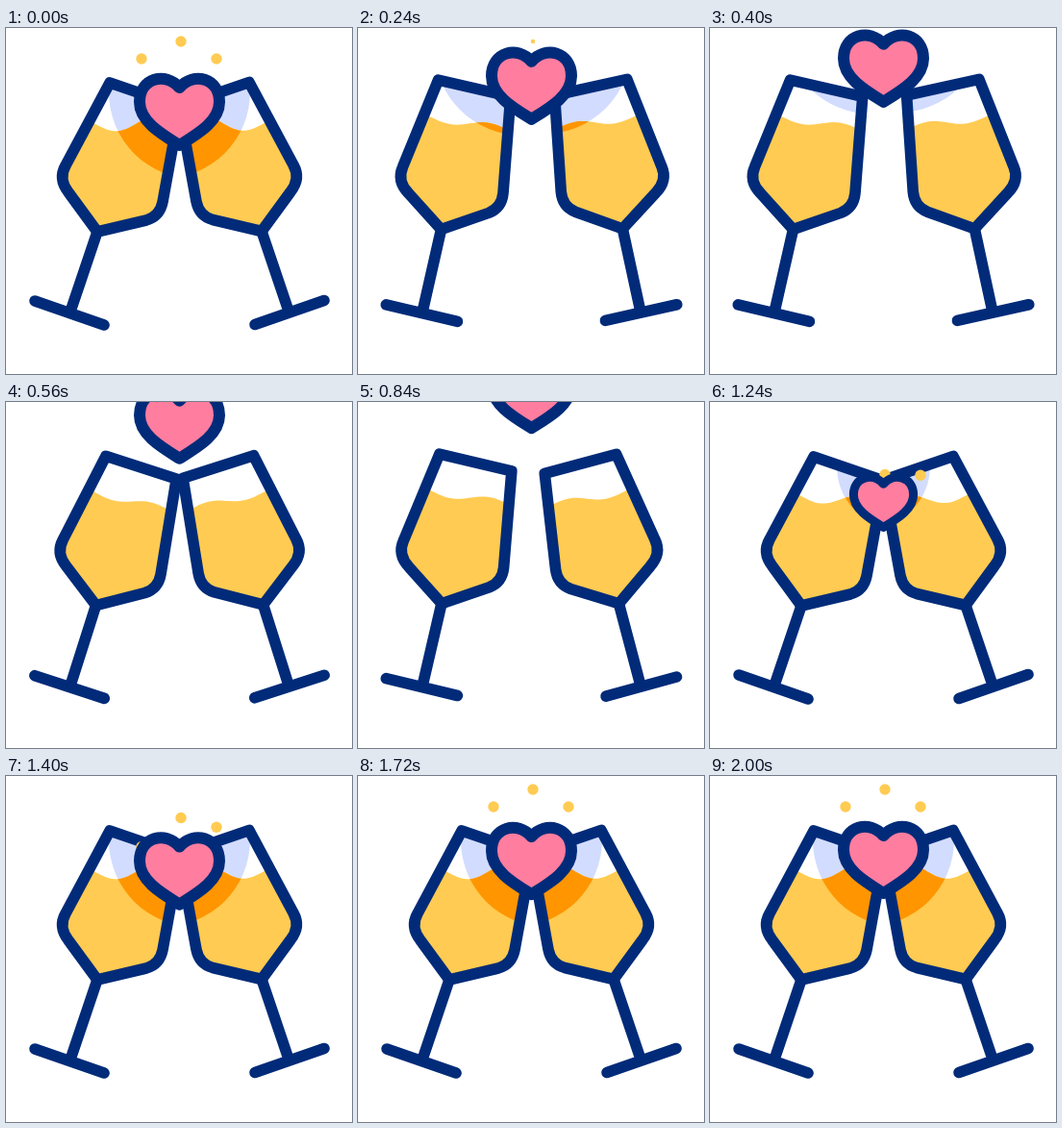
An HTML page with a canvas for the animation above (2.04 s loop, 360 by 360 pixels).

```html
<!DOCTYPE html>
<html lang="en">
<head>
<meta charset="utf-8">
<title>Toast</title>
<style>
  html, body { margin: 0; width: 100%; height: 100%; overflow: hidden; background: #fff; }
  canvas { display: block; width: 360px; height: 360px; }
</style>
</head>
<body>
<canvas id="stage"></canvas>
<script>
const LOOP = 2040, STEP = 40, SIZE = 360;
const SWING = 640, CLINK = 1040;   // end of the first and second swing
const AXIS = 180.5, HEART_Y = 87;
const FOOT = { x: 67, y: 293 };
const NAVY = '#012b79', WINE = '#ffcb52', AMBER = '#ff9500',
      PALE = '#d2dcfe', PINK = '#ff7d9f';

const canvas = document.getElementById('stage');
const ctx = canvas.getContext('2d');
const dpr = window.devicePixelRatio || 1;
canvas.width = canvas.height = SIZE * dpr;

const bowl = new Path2D('M108 57L181 82L163 181Q160 196 146 200L95 212L65 171Q54 157 62 143Z');
const stand = new Path2D('M95 212L68 292M30 284L102 309');
const heart = new Path2D('M180.5 62C166 45 139 52 139 77C139 97 161 110 180.5 122' +
                         'C200 110 222 97 222 77C222 52 195 45 180.5 62Z');

const ramp = (t, a, b) => Math.min(1, Math.max(0, (t - a) / (b - a)));
const smooth = p => (1 - Math.cos(Math.PI * p)) / 2;
const mix = (a, b, p) => a + (b - a) * p;
const bump = p => Math.sin(Math.PI * p) ** 2;

// Peak tilt in degrees of the two swings
const glasses = [
  { mirror: false, first: 6.9, second: 5.6 },
  { mirror: true, first: 7.6, second: 3.8 }
];

const dots = [
  { x: 141, y: 32, start: 1320, fadeEnd: 200 },
  { x: 182, y: 14, start: 1190, fadeEnd: 400 },
  { x: 219, y: 32, start: 1190, fadeEnd: 200 }
];

function disc(x, y, r, color) {
  ctx.fillStyle = color;
  ctx.beginPath();
  ctx.arc(x, y, r, 0, Math.PI * 2);
  ctx.fill();
}

function tiltBy(deg) {
  ctx.translate(FOOT.x, FOOT.y);
  ctx.rotate(deg * Math.PI / 180);
  ctx.translate(-FOOT.x, -FOOT.y);
}

// The surface slopes and flattens while the glass is in motion
function winePath(tilt, t) {
  const slosh = smooth(ramp(t, 0, 240)) * (1 - smooth(ramp(t, CLINK, 1400)));
  const left = 90 + tilt * 3.2;
  const outer = 101 - 9 * slosh;
  const inner = 99 + (15 + 1.5 * tilt) * slosh;
  const wave = 7 - 3 * slosh;
  const path = new Path2D();
  path.moveTo(left - 40, 260);
  for (let u = -0.4; u <= 1.4; u += 0.04) {
    path.lineTo(left + 80 * u, mix(outer, inner, u) + wave * Math.sin(2 * Math.PI * (u - 0.06)));
  }
  path.lineTo(left + 130, 260);
  path.closePath();
  return path;
}

function drawGlass({ mirror, first, second }, t) {
  const tilt = -first * bump(ramp(t, 0, SWING)) - second * bump(ramp(t, SWING, CLINK));
  const wine = winePath(tilt, t);
  const leaving = t < CLINK;
  const radius = leaving ? 90 : 90 * smooth(ramp(t, CLINK - 20, 1360));
  const glow = color => disc(197, 67 - (leaving ? 0.14 * t : 0), radius, color);

  ctx.save();
  if (mirror) {
    ctx.translate(2 * AXIS, -0.5);
    ctx.scale(-1, 1);
  }
  tiltBy(tilt);

  ctx.save();
  ctx.clip(bowl);
  glow(PALE);
  tiltBy(-tilt);
  ctx.fillStyle = WINE;
  ctx.fill(wine);
  ctx.clip(wine);
  tiltBy(tilt);
  glow(AMBER);
  ctx.restore();

  ctx.strokeStyle = NAVY;
  ctx.lineWidth = 11.6;
  ctx.stroke(stand);
  ctx.stroke(bowl);
  ctx.restore();
}

function drawHeart(offset, scale) {
  if (scale <= 0) return;
  ctx.save();
  ctx.translate(AXIS, HEART_Y + offset);
  ctx.scale(scale, scale);
  ctx.translate(-AXIS, -HEART_Y);
  ctx.fillStyle = PINK;
  ctx.strokeStyle = NAVY;
  ctx.lineWidth = 12;
  ctx.fill(heart);
  ctx.stroke(heart);
  ctx.restore();
}

function drawDot({ x, y, start, fadeEnd }, t) {
  if (t < fadeEnd) disc(x, y, 5.7 * (1 - ramp(t, 0, fadeEnd)), WINE);
  if (t > start) disc(x, mix(78, y, smooth(ramp(t, start, start + 400))), 5.7, WINE);
}

function draw(t) {
  ctx.setTransform(dpr, 0, 0, dpr, 0, 0);
  ctx.fillStyle = '#fff';
  ctx.fillRect(0, 0, SIZE, SIZE);
  ctx.lineCap = ctx.lineJoin = 'round';
  glasses.forEach(g => drawGlass(g, t));
  dots.forEach(d => drawDot(d, t));
  if (t < 1160) drawHeart(-0.113 * t, 1);
  drawHeart(20 * (1 - smooth(ramp(t, CLINK, 1840))), ramp(t, 1000, 1320));
}

const begin = performance.now();
function frame() {
  const t = (performance.now() - begin) % LOOP;
  draw(Math.floor(t / STEP) * STEP);
  requestAnimationFrame(frame);
}
frame();
</script>
</body>
</html>
```
